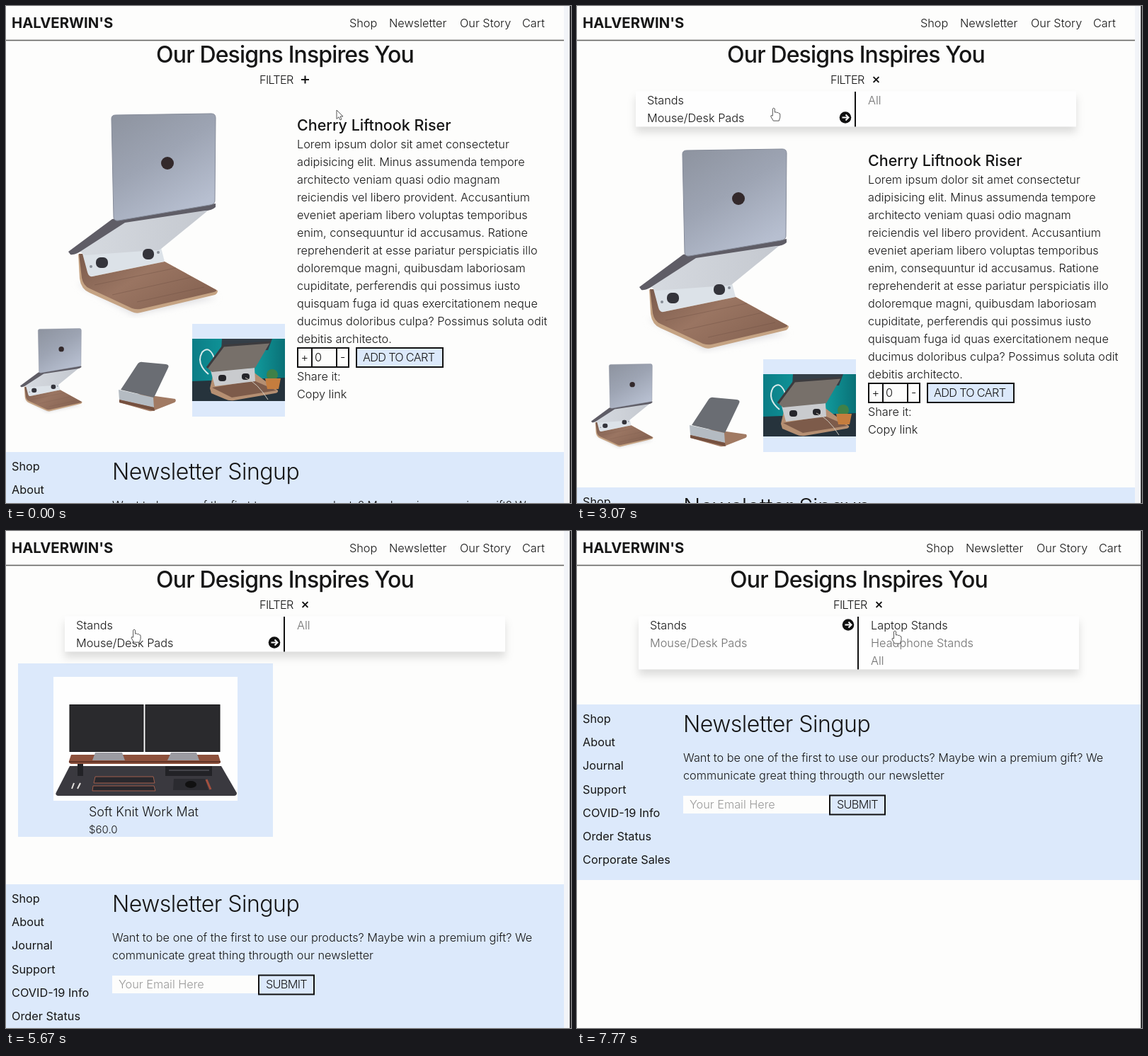
An HTML page for the animation above (8 s loop, 798x702 px).

```html
<!DOCTYPE html>
<html lang="en">
<head>
<meta charset="utf-8">
<title>Shop filter</title>
<style>
  html, body { margin: 0; width: 100%; height: 100%; overflow: hidden; background: #fdfdfc; }
  svg { display: block; }
  text { font: 300 16.3px Inter, sans-serif; fill: #161616; }
  .caps { letter-spacing: -.7px; }
  .menu text { font-weight: 400; }
  .brand { font-size: 20.3px; font-weight: 700; }
  .title { font-size: 32px; font-weight: 500; letter-spacing: -.85px; text-anchor: middle; }
  .product { font-size: 21.5px; font-weight: 500; }
  .signup { font-size: 32px; letter-spacing: -.5px; }
  .card { font-size: 18px; }
  .price { font-size: 15px; }
  .hint { fill: #999; }
  .box { fill: none; stroke: #111; stroke-width: 2; }
  .blue { fill: #dce9fb; }
  #panel { filter: drop-shadow(0 8px 6px rgba(0, 0, 0, .13)); }
</style>
</head>
<body>
<svg width="798" height="702" viewBox="0 0 798 702">
  <defs>
    <linearGradient id="lid" x2=".6" y2="1"><stop stop-color="#8d939f"/><stop offset=".5" stop-color="#9da4b3"/><stop offset="1" stop-color="#b7bfd0"/></linearGradient>
    <linearGradient id="plate" x2="1"><stop stop-color="#d6dae0"/><stop offset="1" stop-color="#c4c8cf"/></linearGradient>
    <linearGradient id="wood" x2="1" y2=".6"><stop stop-color="#7b5b4c"/><stop offset=".5" stop-color="#9a7562"/><stop offset="1" stop-color="#876453"/></linearGradient>
    <linearGradient id="wall" x2="1"><stop stop-color="#0b7d86"/><stop offset=".6" stop-color="#12a3a4"/><stop offset="1" stop-color="#0a7076"/></linearGradient>
    <filter id="soft"><feGaussianBlur stdDeviation="5"/></filter>
    <clipPath id="reveal"><rect id="revealBox" x="60" y="120.5" width="680"/></clipPath>

    <g id="stand">
      <path d="M100 392L180 436L298 412L230 400Z" fill="#dedee1" filter="url(#soft)"/>
      <path d="M102 350L104 385Q106 400 118 405L178 432Q184 435 190 433L295 408Q299 406 299 402L224 361L118 370Z" fill="#c5a383"/>
      <path d="M103 350L107 384Q109 395 118 399L178 427Q184 429 190 428L294 404Q298 403 297 401L224 361L122 382L111 350Z" fill="url(#wood)"/>
      <path d="M125 394L240 370M150 408L262 383M185 418L280 397" stroke="#6c4f42" stroke-opacity=".4" fill="none"/>
      <path d="M107 346L217 334L224 361L122 382Q117 383 115 376Z" fill="#dce2e8"/>
      <path d="M103 346L168 303L290 285L219 343Q215 346 209 345L112 352Z" fill="url(#plate)"/>
      <rect x="127" y="355" width="17" height="15" rx="6.5" fill="#34343b"/>
      <rect x="193" y="343" width="16" height="15" rx="6.5" fill="#34343b"/>
      <g fill="#868c95"><circle cx="120" cy="368" r="2"/><circle cx="215" cy="348" r="2"/></g>
      <path d="M88 347L150 301L296 279V284Q291 289 281 289L168 306L103 348Q95 352 91 351Z" fill="#5f5d66"/>
      <path d="M149 159Q149 154 155 154L290 152Q296 152 296 158L295 275Q295 280 288 281L159 303Q152 304 152 298Z" fill="url(#lid)" stroke="#858b99"/>
      <circle cx="228" cy="222" r="9" fill="#33292b"/>
    </g>
  </defs>

  <rect width="798" height="702" fill="#fdfdfc"/>

  <g id="productPage">
    <use href="#stand"/>
    <use href="#stand" transform="translate(-16.5 392.5) scale(.415)"/>
    <g>
      <path d="M160 555L190 548L239 555Q241 558 238 560L210 571Q206 573 202 572L160 560Z" fill="#a17a63"/>
      <path d="M162 542L185 507Q188 502 193 503L226 506Q231 507 229 511L209 553Z" fill="#6a6d73"/>
      <path d="M159 542L208 553L209 567L160 556Z" fill="#b4bbc2"/>
      <path d="M160 556L209 567L210 572L160 560Z" fill="#75503f"/>
    </g>
    <g>
      <rect class="blue" x="263" y="449" width="131" height="131"/>
      <rect x="263" y="470" width="131" height="88" fill="url(#wall)"/>
      <path d="M263 530L394 525V558H263Z" fill="#26333c"/>
      <path d="M286 520Q268 505 277 489Q288 478 295 500" fill="none" stroke="#d7e9e9" stroke-width="2"/>
      <path d="M288 540L294 514L344 513L384 543Q385 546 380 547L322 557Q315 558 309 555L290 547Z" fill="#b58f72"/>
      <path d="M291 539L350 529L382 543L319 553Z" fill="#7d5b4a"/>
      <path d="M289 515L351 511L352 530L295 537Z" fill="#c9cbce"/>
      <path d="M305 470H376L370 486L304 487Z" fill="#343e47"/>
      <path d="M284 511L307 480L373 475L352 511L291 517Z" fill="#77706a"/>
      <path d="M284 511L307 480L373 475" fill="none" stroke="#3c3b3e" stroke-width="3"/>
      <rect x="300" y="521" width="11" height="9" rx="4" fill="#25252a"/>
      <rect x="333" y="519" width="11" height="9" rx="4" fill="#25252a"/>
      <path d="M338 525Q355 532 370 556" fill="none" stroke="#cfc8bd"/>
      <circle cx="376" cy="521" r="8" fill="#3f8148"/>
      <path d="M366 526H388L385 541H369Z" fill="#c57d3e"/>
    </g>
    <text class="product" x="411" y="176">Cherry Liftnook Riser</text>
    <g id="description"></g>
    <path class="box" d="M412 483H484V510H412ZM432 483V510M467 483V510"/>
    <rect class="blue" x="495" y="483" width="122" height="27" stroke="#111" stroke-width="2"/>
    <text x="416.500" y="502">+</text><text x="436" y="502">0</text><text x="472" y="502">-</text>
    <text class="caps" x="504" y="502">ADD TO CART</text>
    <text x="411" y="529">Share it:</text>
    <text x="411" y="554">Copy link</text>
  </g>

  <g id="cardPage">
    <rect class="blue" x="17" y="137" width="360" height="245"/>
    <rect x="67" y="156" width="260" height="175" fill="#fefefe"/>
    <path d="M90 282H304L326 320Q326 324 322 324H73Q69 323 71 319Z" fill="#3a393f"/>
    <path d="M101 277h8v19h-8zM225 282h66v14h-66z" fill="#222226"/>
    <path d="M230 288h57" stroke="#65656c"/>
    <path d="M92 266H300L303 276Q303 279 299 279H92Q88 278 89 275Z" fill="#8d513c"/>
    <path d="M89 276H303" stroke="#623528" stroke-width="2"/>
    <path d="M126 263h38l4 11h-46zM233 263h36l4 11h-45z" fill="#9b9ba1"/>
    <g fill="#2a2a2d" stroke="#151517"><rect x="90" y="195.500" width="104" height="66"/><rect x="197" y="195.500" width="105" height="66"/></g>
    <path d="M126 297h82l2 9h-86zM123 310h86l2 7h-89z" fill="#29282d" stroke="#a25f4c"/>
    <path d="M237 300h44l5 16h-50z" fill="#2b2b30"/>
    <ellipse cx="261" cy="308" rx="8" ry="5" fill="#111"/>
    <path d="M283 301l6 14" stroke="#a4503e" stroke-width="3"/>
    <path d="M96 306l-3 8M105 306l-4 8" stroke="#e5e2df" stroke-width="2"/>
    <text class="card" x="117" y="353">Soft Knit Work Mat</text>
    <text class="price" x="117" y="377">$60.0</text>
  </g>

  <g id="footer">
    <rect class="blue wide" height="248"/>
    <g id="links" class="menu"></g>
    <text class="signup" x="150" y="39">Newsletter Singup</text>
    <g id="pitch"></g>
    <rect x="150" y="129" width="206" height="25" fill="#fdfdfc"/>
    <text class="hint" x="159" y="147">Your Email Here</text>
    <rect class="box" x="357" y="128.500" width="78" height="27"/>
    <text class="caps" x="367" y="147">SUBMIT</text>
  </g>

  <text class="brand" x="8" y="31">HALVERWIN'S</text>
  <g id="nav">
    <text x="485" y="30">Shop</text><text x="541" y="30">Newsletter</text>
    <text x="641" y="30">Our Story</text><text x="729" y="30">Cart</text>
  </g>
  <rect class="wide" y="47.700" height="1.600" fill="#666663"/>

  <g id="center">
    <text class="title" x="394" y="80">Our Designs Inspires You</text>
    <text class="caps" x="358" y="110">FILTER</text>
    <path id="plus" d="M-5.500 0H5.500M0 -5.500V5.500" stroke="#111" stroke-width="2"/>
    <rect id="panel" x="83" y="120.500" width="622" fill="#fefefe"/>
    <g clip-path="url(#reveal)">
      <path d="M393 121V196" stroke="#111" stroke-width="2"/>
      <g id="groups"></g>
      <g id="choices"></g>
      <g id="arrow">
        <circle r="8.300" fill="#111"/>
        <path d="M-4.500 0H4M.500 -4L4.500 0L.500 4" fill="none" stroke="#fff" stroke-width="2"/>
      </g>
    </g>
  </g>

  <rect id="scrollbar" x="788" width="8" height="702" fill="#f2f4f8"/>
  <rect x="796.300" width="1.700" height="702" fill="#17171b"/>

  <g id="cursor" fill="#fff" stroke="#555" stroke-linejoin="round">
    <path id="pointer" d="M0 0V12.500L3 9.800L5 14L7 13L5 9H9Z"/>
    <path id="hand" d="M-1.500 1Q0 -1 1.500 1V6Q3.500 5 4.500 6.500Q6.500 5.500 7.300 7.500Q9 7.200 9 9V13L7.500 18H-.500L-4 12Q-4.500 9.500 -1.500 11Z"/>
  </g>
</svg>
<script>
const LOOP = 8000, ROW = 25, TOP = 120.5;
const $ = id => document.getElementById(id);
const clamp = p => Math.min(1, Math.max(0, p));
const easeOut = p => 1 - (1 - p) ** 2;
const move = (id, x, y) => $(id).setAttribute('transform', `translate(${x} ${y})`);
const show = (id, on) => $(id).style.display = on ? '' : 'none';

function addLines(id, x, y, step, lines) {
  $(id).innerHTML = lines.map((s, i) => `<text x="${x}" y="${y + i * step}">${s}</text>`).join('');
}

addLines('description', 411, 201, ROW, [
  'Lorem ipsum dolor sit amet consectetur', 'adipisicing elit. Minus assumenda tempore',
  'architecto veniam quasi odio magnam', 'reiciendis vel libero provident. Accusantium',
  'eveniet aperiam libero voluptas temporibus', 'enim, consequuntur id accusamus. Ratione',
  'reprehenderit at esse pariatur perspiciatis illo', 'doloremque magni, quibusdam laboriosam',
  'cupiditate, perferendis qui possimus iusto', 'quisquam fuga id quas exercitationem neque',
  'ducimus doloribus culpa? Possimus soluta odit', 'debitis architecto.']);
addLines('links', 8, 26, 33.2, ['Shop', 'About', 'Journal', 'Support', 'COVID-19 Info', 'Order Status', 'Corporate Sales']);
addLines('pitch', 150, 81, ROW, [
  'Want to be one of the first to use our products? Maybe win a premium gift? We',
  'communicate great thing througth our newsletter']);
addLines('groups', 99, 139, ROW, ['Stands', 'Mouse/Desk Pads']);

const choices = [['Laptop Stands', 'Headphone Stands', 'All'], ['All']];
const footerTop = { product: 630, card: 449, empty: 170 };

// Cursor stops: time, x, y
const stops = [
  [100, 467, 147], [400, 424, 102], [1370, 424, 102], [2100, 241, 148],
  [3000, 241, 148], [3630, 414, 130], [4670, 414, 130], [5030, 231, 146],
  [5500, 231, 146], [6000, 143, 134], [6670, 143, 134], [7300, 449, 141]];

function cursorAt(t) {
  const next = stops.findIndex(s => s[0] > t);
  if (next === 0) return stops[0].slice(1);
  if (next < 0) return stops[stops.length - 1].slice(1);
  const [t0, x0, y0] = stops[next - 1], [t1, x1, y1] = stops[next];
  const p = easeOut((t - t0) / (t1 - t0));
  return [x0 + (x1 - x0) * p, y0 + (y1 - y0) * p];
}

let shownGroup = -1;

function draw(t) {
  const group = t >= 2830 && t < 6470 ? 1 : 0;
  const page = t < 4070 ? 'product' : t < 7770 ? 'card' : 'empty';
  const open = easeOut(clamp((t - 930) / 200));
  const height = open * ROW * (group ? 2 : 3);
  const width = page === 'empty' ? 796 : 788;
  const [x, y] = cursorAt(t);

  if (group !== shownGroup) {
    addLines('choices', 411, 139, ROW, choices[group]);
    shownGroup = group;
  }
  const hovered = open && x > 99 && x < 705 ? Math.floor((y - TOP) / ROW) : -1;
  const tint = (id, column, active) => [...$(id).children].forEach((item, i) => {
    const on = i === active || (i === hovered && column === +(x > 393));
    item.style.fill = on ? '#161616' : '#707070';
  });
  tint('groups', 0, group);
  tint('choices', 1, -1);

  document.querySelectorAll('.wide').forEach(e => e.setAttribute('width', width));
  move('nav', width - 788, 0);
  move('center', (width - 788) / 2, 0);
  show('scrollbar', width === 788);
  $('plus').setAttribute('transform', `translate(422.5 104) rotate(${45 * open})`);
  $('panel').setAttribute('height', height);
  $('revealBox').setAttribute('height', height);
  show('panel', height > 0);
  move('arrow', 379, 132.5 + group * ROW);

  for (const name of ['product', 'card']) {
    show(name + 'Page', page === name);
    move(name + 'Page', 0, height);
  }
  move('footer', 0, footerTop[page] + height);

  const overLink = t > 300;
  show('pointer', !overLink);
  show('hand', overLink);
  move('cursor', x, y);
}

function tick() {
  draw(performance.now() % LOOP);
  requestAnimationFrame(tick);
}
tick();
</script>
</body>
</html>
```
